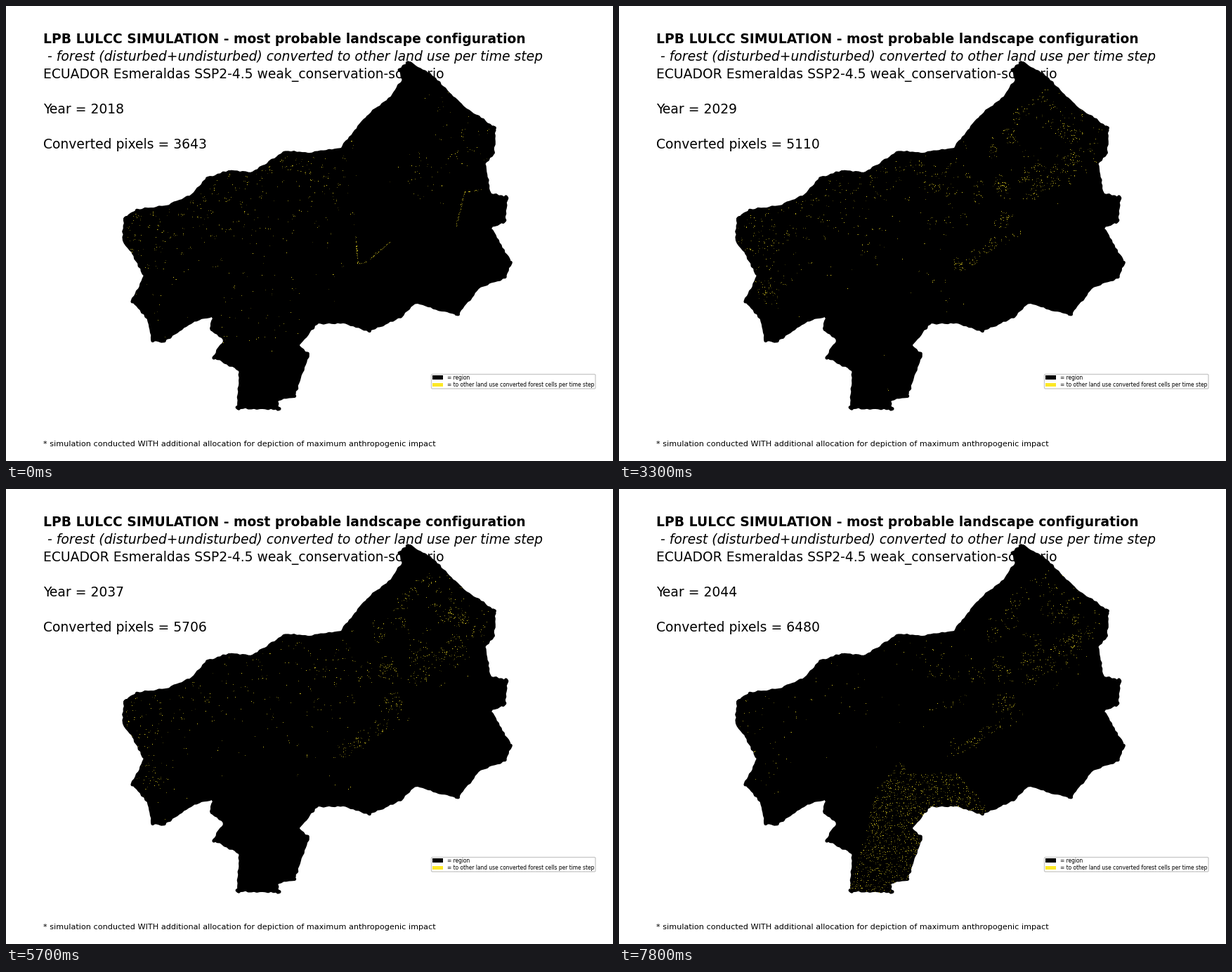
A matplotlib script for the animation above (8000 ms loop, 864 by 648 pixels).

```python
import numpy as np
import matplotlib.pyplot as plt
from matplotlib.animation import FuncAnimation
from matplotlib.patches import FancyBboxPatch, Polygon, Rectangle
from matplotlib.path import Path

W, H, DPI = 864, 648, 135
PX = 72 / DPI  # one pixel in points
FRAMES, INTERVAL, FRAMES_PER_YEAR = 80, 100, 3
YELLOW = np.array([0.99, 0.91, 0.15])

OUTLINE = np.array([
    (165, 333), (168, 301), (186, 289), (228, 284), (264, 268), (286, 244),
    (317, 234), (351, 236), (398, 206), (432, 209), (476, 202), (513, 156),
    (547, 129), (563, 105), (559, 90), (573, 78), (606, 97), (650, 141),
    (697, 173), (695, 211), (683, 224), (690, 266), (714, 272), (711, 308),
    (691, 316), (720, 366), (711, 388), (676, 400), (643, 441), (583, 424),
    (562, 444), (517, 464), (480, 452), (443, 453), (417, 484), (432, 496),
    (411, 557), (387, 562), (389, 575), (328, 573), (332, 520), (294, 500),
    (309, 476), (290, 460), (294, 442), (267, 450), (225, 479), (207, 477),
    (201, 446), (178, 420), (196, 385), (178, 351)], float)
COAST = OUTLINE[1:13]
REGION = Path(OUTLINE)
SOUTH = Path([(402, 385), (412, 406), (480, 404), (526, 456), (400, 580), (326, 576), (368, 425)])
FRONTIER = [(600, 125), (530, 215), (553, 292), (549, 330), (520, 347), (463, 382)]
NORTHEAST = [(592, 270), (583, 235), (640, 238), (656, 190), (608, 140)]
ROADS = [[(498, 328), (501, 368), (516, 363), (546, 337)],
         [(641, 314), (653, 265), (676, 262)]]


def along(path, t):
    """Points at the fractions t of a polyline's length."""
    path = np.array(path, float)
    dist = np.r_[0, np.cumsum(np.hypot(*np.diff(path, axis=0).T))]
    return np.column_stack([np.interp(t * dist[-1], dist, path[:, k]) for k in (0, 1)])


def scalloped(points, inset=2.5, wobble=1.1):
    """Densify a clockwise outline and roughen it across its edges."""
    rng = np.random.default_rng(4)
    result = []
    for a, b in zip(points, np.roll(points, -1, axis=0)):
        length = np.hypot(*(b - a))
        normal = np.array([a[1] - b[1], b[0] - a[0]]) / length
        for t in np.arange(0, 1, 4 / length):
            result.append(a + (b - a) * t + normal * (inset + rng.uniform(-wobble, wobble)))
    return np.array(result)


# Places that stay the same through the years
fixed = np.random.default_rng(11)
west_x = fixed.uniform(170, 500, 520)
west = np.column_stack([west_x, np.interp(west_x, *COAST.T) + 7 + fixed.exponential(62, 520)])
east = along(NORTHEAST, fixed.random(130)) + fixed.normal(0, 17, (130, 2))
rings = np.vstack([along(FRONTIER, fixed.random(46)) + fixed.normal(0, 6, (46, 2)),
                   along(NORTHEAST, fixed.random(26)) + fixed.normal(0, 10, (26, 2)),
                   fixed.uniform((440, 235), (530, 320), (12, 2))])
ring_size = fixed.uniform(0.6, 1.25, len(rings))


def scatter_near(rng, anchors, count, spread):
    picks = anchors[rng.integers(0, len(anchors), count)]
    return picks + rng.normal(0, spread, (count, 2))


def ring_cells(rng, step):
    """Broken circles that widen around each clearing."""
    cells = []
    for centre, size in zip(rings, ring_size):
        radius = size * min(1.5 + 0.32 * step, 7.5)
        fill = rng.uniform(0.2, 0.9) if step < 19 else rng.uniform(0.1, 0.5)
        angle = rng.uniform(0, 2 * np.pi) + rng.uniform(0, 5, int(2.6 * radius * fill) + 1)
        cells.append(centre + radius * np.column_stack([np.cos(angle), np.sin(angle)]))
    return np.vstack(cells)


def converted_cells(step):
    rng = np.random.default_rng(100 + step)
    fade = np.interp(step, [4, 16, 26], [1, 0.75, 0.2])
    parts = [scatter_near(rng, west, int(500 * fade), 1.3),
             scatter_near(rng, east, 90 if step == 0 else 200, 2.5)]
    if step == 0:
        for road in ROADS:
            count = int(0.75 * np.abs(np.diff(road, axis=0)).sum())
            parts.append(along(road, rng.random(count)) + rng.normal(0, 0.5, (count, 2)))
        parts.append(rng.uniform((300, 380), (420, 480), (45, 2)))
    else:
        parts.append(ring_cells(rng, step))
        parts.append(rng.normal((208, 408), 13, (int(60 * fade), 2)))
        parts.append(rng.normal((205, 345), 18, (int(45 * fade), 2)))
    south_count = int(np.interp(step, [19, 22, 26], [0, 2000, 3000]))
    field = rng.uniform((325, 385), (527, 576), (south_count, 2))
    parts.append(field[SOUTH.contains_points(field)])
    cells = np.vstack(parts)
    cells = np.floor(cells[REGION.contains_points(cells)]) + 0.5
    level = 0.18 + 0.75 * rng.random(len(cells)) ** 1.5
    return cells, level[:, None] * YELLOW


def converted_total(step):
    return round(np.interp(step, [0, 4, 7, 11, 16, 20, 22, 26],
                           [3643, 4811, 4960, 5110, 5453, 5790, 7703, 6480]))


plt.rcParams["font.family"] = "DejaVu Sans"
fig = plt.figure(figsize=(W / DPI, H / DPI), dpi=DPI, facecolor="white")
ax = fig.add_axes([0, 0, 1, 1])
ax.set(xlim=(0, W), ylim=(H, 0))
ax.axis("off")


def label(x, y, text, size=10, **style):
    return ax.text(x, y, text, fontsize=size, va="baseline", **style)


label(53, 53, "LPB LULCC SIMULATION - most probable landscape configuration", weight="bold")
label(53, 78, " - forest (disturbed+undisturbed) converted to other land use per time step",
      style="italic")
label(53, 103, "ECUADOR Esmeraldas SSP2-4.5 weak_conservation-scenario")
year_text = label(53, 153, "")
total_text = label(53, 203, "")
label(53, 627, "* simulation conducted WITH additional allocation for depiction of "
      "maximum anthropogenic impact", 6)

ax.add_patch(Polygon(scalloped(OUTLINE), facecolor="black", edgecolor="black",
                     linewidth=5 * PX, joinstyle="round"))
dots = ax.scatter([], [], s=PX ** 2, marker="s", linewidths=0, zorder=3)

ax.add_patch(FancyBboxPatch((607.5, 526.5), 229.5, 16.5, facecolor="white", edgecolor="#c8c8c8",
                            boxstyle="round,pad=2,rounding_size=1.5", linewidth=1.3 * PX))
for y, color, text in [(526.3, "black", "= region"),
                       (536.7, YELLOW, "= to other land use converted forest cells per time step")]:
    ax.add_patch(Rectangle((607, y), 15, 5.2, facecolor=color, linewidth=0))
    label(628, y + 5.2, text, 4)


def update(frame):
    step = frame // FRAMES_PER_YEAR
    year_text.set_text(f"Year = {2018 + step}")
    total_text.set_text(f"Converted pixels = {converted_total(step)}")
    cells, colors = converted_cells(step)
    dots.set_offsets(cells)
    dots.set_facecolors(colors)
    return year_text, total_text, dots


anim = FuncAnimation(fig, update, frames=FRAMES, interval=INTERVAL, repeat=True,
                     repeat_delay=0, blit=False)
plt.show()
```
